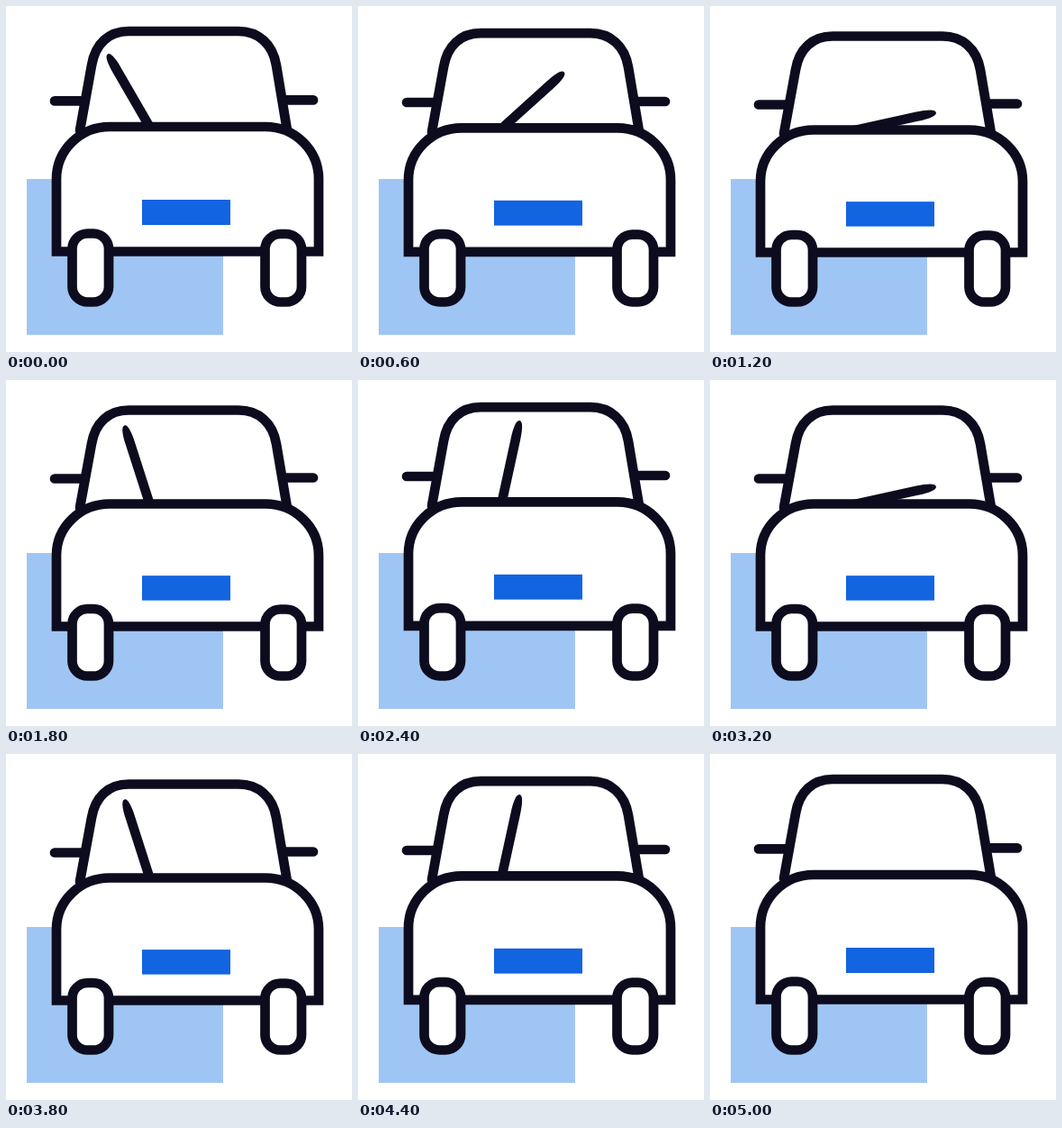
An HTML page for the animation above (5.96 s loop, 384 by 384 pixels).

```html
<!DOCTYPE html>
<html lang="en">
<head>
<meta charset="utf-8">
<title>Car with wiper</title>
<style>
  html, body { margin: 0; width: 100%; height: 100%; overflow: hidden; background: #fff; }
  svg { display: block; width: 100vw; height: 100vh; }
  #car { fill: #fff; stroke: #0c0c1e; stroke-width: 10.7; stroke-linecap: round; }
  #wiper { fill: #0c0c1e; stroke: none; }
</style>
</head>
<body>
<svg viewBox="0 0 384 384">
  <rect x="23" y="192" width="218" height="173" fill="#9fc5f4"/>
  <g id="car">
    <path d="M54 105.4H88M341 104.4H309"/>
    <path d="M82 138L95 66C99 42 114 28 136 28H258C280 28 296 42 300 66L312 138"/>
    <path id="wiper" d="M-5.3 0V-72C-5.3 -84 -4 -93.5 0 -93.5S5.3 -84 5.3 -72V0Z"/>
    <path d="M56 272.5V192A59 58 0 0 1 115 134H288A59 58 0 0 1 347 192V272.5Z"/>
    <rect x="151" y="215" width="98" height="28" fill="#1264e0" stroke="none"/>
    <rect x="73.5" y="252.5" width="40.5" height="76" rx="17"/>
    <rect x="287.5" y="253" width="40.5" height="75.5" rx="17"/>
  </g>
</svg>
<script>
  const LOOP = 5960, MOVE_END = 5000, STEP = 40, GROUND = 334;
  const car = document.getElementById('car');
  const wiper = document.getElementById('wiper');

  // Eased back-and-forth between 0 and 1, one way taking `half` ms
  function swing(t, half) {
    const phase = (t / half) % 2;
    const u = phase > 1 ? 2 - phase : phase;
    return u * u * (3 - 2 * u);
  }

  function draw(now) {
    const t = Math.min(Math.floor((now % LOOP) / STEP) * STEP, MOVE_END);
    const squash = 1 - 0.02 * swing(t, 250);
    const angle = -30 + 120 * swing(t, 1000);
    car.setAttribute('transform', `translate(0 ${GROUND * (1 - squash)}) scale(1 ${squash})`);
    wiper.setAttribute('transform', `translate(159.6 134.4) rotate(${angle})`);
  }

  const start = performance.now();
  function tick() {
    draw(performance.now() - start);
    requestAnimationFrame(tick);
  }
  tick();
</script>
</body>
</html>
```
